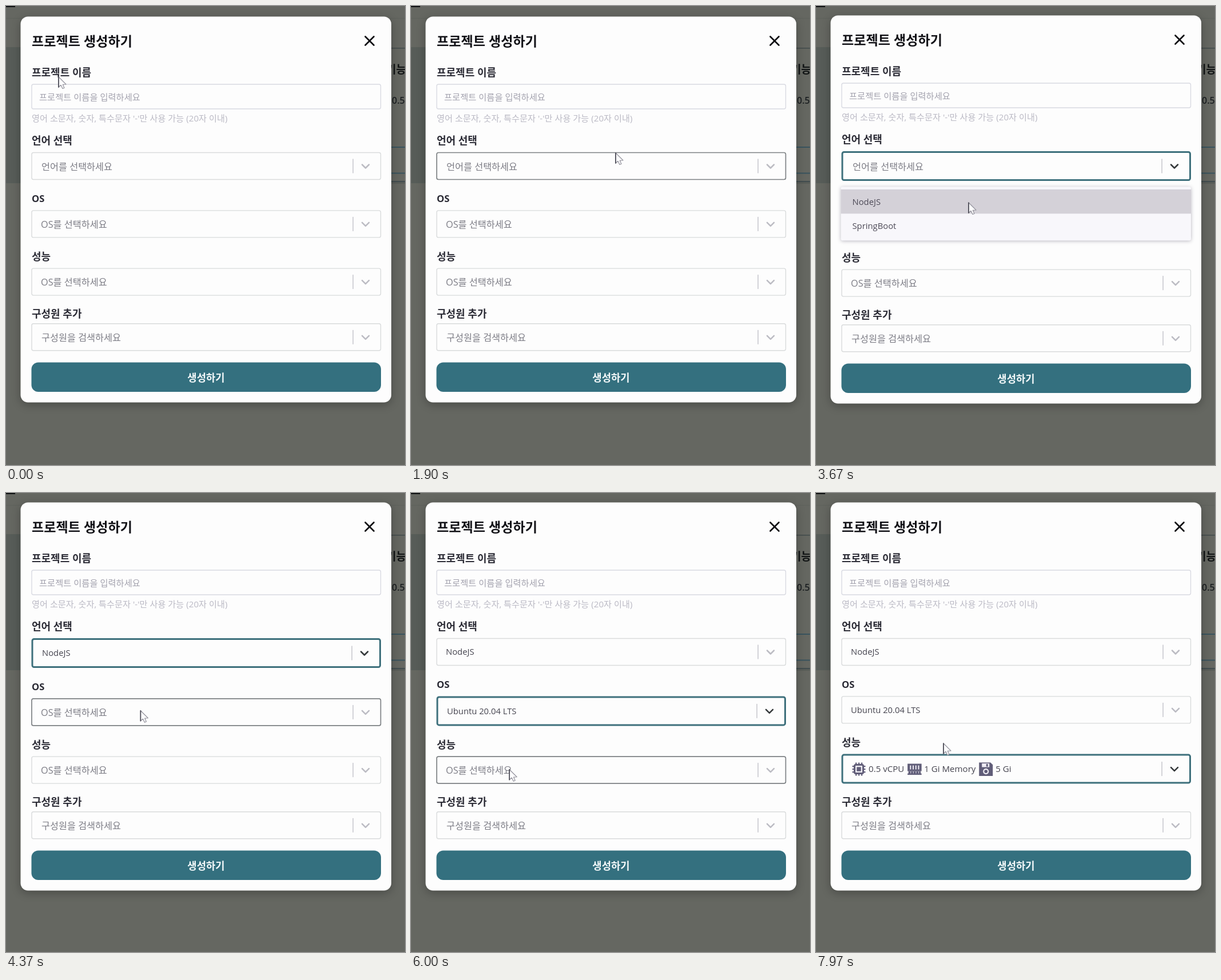
These frames come from a looping animation (698x803 px, 8000 ms). An HTML page with a canvas:

```html
<!DOCTYPE html>
<html lang="ko">
<head>
<meta charset="utf-8">
<style>
  html, body { margin: 0; width: 100%; height: 100%; overflow: hidden; background: #656761; }
  canvas { display: block; width: 698px; height: 803px; filter: blur(.5px); }
</style>
</head>
<body>
<canvas id="stage"></canvas>
<script>
const W = 698, H = 803, LOOP = 8000;
const FONT = '"Open Sans", "Noto Sans CJK KR", "Noto Sans CJK", sans-serif';
const BACK = '#656761', TEAL = '#34707f', ICON = '#605d78', PALE = '#efedf4';
const canvas = document.getElementById('stage');
const ctx = canvas.getContext('2d');
const dpr = window.devicePixelRatio || 1;
canvas.width = W * dpr;
canvas.height = H * dpr;

const SPECS = [['0.5', '1'], ['0.5', '2'], ['1', '1'], ['1', '2']];

// Resting positions; opened and picked are the times of the two clicks.
const SELECTS = [
  { label: '언어 선택', labelY: 235.5, top: 256, hint: '언어를 선택하세요', hintX: 62,
    options: ['NodeJS', 'SpringBoot'], row: 42.5, opened: 3070, picked: 4000 },
  { label: 'OS', labelY: 336.5, top: 357.4, hint: 'OS를 선택하세요', hintX: 61,
    options: ['Ubuntu 20.04 LTS'], row: 42.5, opened: 4470, picked: 5230 },
  { label: '성능', labelY: 438, top: 458.6, hint: 'OS를 선택하세요', hintX: 61,
    options: SPECS, row: 44.6, opened: 6030, picked: 7600 },
  { label: '구성원 추가', labelY: 538.5, top: 555.3, hint: '구성원을 검색하세요', hintX: 62,
    options: [], row: 42.5, opened: Infinity, picked: Infinity }
];

// time, x, y of the pointer tip
const PATH = [
  [0, 92, 124], [250, 93, 125], [1650, 358, 256], [1900, 358, 257], [2770, 350, 262],
  [3070, 345, 276], [3670, 267, 344], [4000, 262, 348], [4470, 232, 385],
  [5230, 202, 446], [5430, 200, 449], [6030, 172, 484], [6600, 150, 536],
  [6770, 150, 537], [7170, 151, 541], [7570, 151, 541], [7970, 223, 438], [8000, 224, 437]
];

function pointerAt(t) {
  const i = Math.max(1, PATH.findIndex(p => p[0] > t));
  const [t0, x0, y0] = PATH[i - 1], [t1, x1, y1] = PATH[i];
  const u = (t - t0) / (t1 - t0), k = u * u * (3 - 2 * u);
  return { x: x0 + (x1 - x0) * k, y: y0 + (y1 - y0) * k };
}

function rect(x, y, w, h, color) {
  ctx.fillStyle = color;
  ctx.fillRect(x, y, w, h);
}

function roundBox(x, y, w, h, r, fill, stroke, lw) {
  ctx.beginPath();
  ctx.roundRect(x, y, w, h, r);
  if (fill) { ctx.fillStyle = fill; ctx.fill(); }
  if (stroke) { ctx.strokeStyle = stroke; ctx.lineWidth = lw; ctx.stroke(); }
}

function polyline(points, color, lw) {
  ctx.beginPath();
  points.forEach(p => ctx.lineTo(p[0], p[1]));
  ctx.strokeStyle = color;
  ctx.lineWidth = lw;
  ctx.stroke();
}

function polygon(points, color) {
  ctx.beginPath();
  points.forEach(p => ctx.lineTo(p[0], p[1]));
  ctx.closePath();
  ctx.fillStyle = color;
  ctx.fill();
}

// y is the optical middle of the line; returns the text width
function text(str, x, y, size, color, weight = 400, align = 'left') {
  ctx.font = `${weight} ${size}px ${FONT}`;
  ctx.textAlign = align;
  ctx.fillStyle = color;
  ctx.fillText(str, x, y + size * 0.37);
  return ctx.measureText(str).width;
}

function withShadow(color, blur, offset, draw) {
  ctx.save();
  ctx.shadowColor = color;
  ctx.shadowBlur = blur * dpr;
  ctx.shadowOffsetY = offset * dpr;
  draw();
  ctx.restore();
}

function backdrop() {
  rect(0, 0, W, H, BACK);
  rect(0, 72, 30, 238, '#575c58');
  rect(0, 21, W, 1, '#5e615c');
  rect(0, 0, 16, 2, '#0d0f10');
  rect(672, 73, 26, 1.5, '#414a4a');
  rect(672, 246, 26, 2, '#38535e');
  rect(672, 291.5, 26, 2, '#38535e');
  rect(672, 306, 26, 2, '#414d4f');
  rect(672, 308, 26, 3, '#595d58');
  text('기능', 665, 111, 19, '#101314', 700);
  text('0.5', 675, 165, 16, '#1c2022', 600);
}

function chipIcon(x, y) {
  for (let i = -1; i <= 1; i++) {
    rect(x + 11 + i * 5, y - 11, 2.2, 23, ICON);
    rect(x + 0.5, y - 0.5 + i * 5, 23, 2.2, ICON);
  }
  roundBox(x + 4.5, y - 7, 15, 15, 2, PALE, ICON, 3);
  rect(x + 8.3, y - 3.2, 7.4, 7.4, ICON);
}

function memoryIcon(x, y) {
  rect(x, y - 9, 24.5, 13, ICON);
  for (let i = 0; i < 4; i++) rect(x + 4.2 + i * 4.7, y - 6, 2, 7, PALE);
  rect(x + 1.5, y + 4, 21.5, 4.5, ICON);
  for (let i = 0; i < 4; i++) rect(x + 5 + i * 4.6, y + 4.5, 1.2, 4, '#cfccd8');
  rect(x, y + 8, 24.5, 2.5, ICON);
}

function diskIcon(x, y) {
  polygon([[x, y - 11], [x + 20, y - 11], [x + 24, y - 7], [x + 24, y + 12.5], [x, y + 12.5]], ICON);
  rect(x + 5, y - 9.5, 13, 6.5, PALE);
  rect(x + 12.5, y - 8.5, 3, 4.5, ICON);
  ctx.beginPath();
  ctx.arc(x + 12, y + 4.5, 4, 0, Math.PI * 2);
  ctx.strokeStyle = PALE;
  ctx.lineWidth = 2.2;
  ctx.stroke();
}

function drawOption(option, x, y, color) {
  if (typeof option === 'string') {
    text(option, x, y, 14.8, color);
    return;
  }
  const parts = [
    [chipIcon, option[0] + ' vCPU'],
    [memoryIcon, option[1] + ' Gi Memory'],
    [diskIcon, '5 Gi']
  ];
  for (const [icon, str] of parts) {
    icon(x, y);
    x += 29;
    x += text(str, x, y, 15.1, color) + 5.8;
  }
}

function drawSelect(s, t, y, focused, hovered) {
  const h = focused ? 52 : 48, mid = y + h / 2 + 0.5;
  const shift = focused ? 2 : 0;
  if (focused) roundBox(46, y + 1.5, 608.5, h - 3, 3, '#fdfdfd', '#3e707c', 3);
  else roundBox(45, y + 0.5, 610.5, h - 1, 3, '#fdfdfd', hovered ? '#7c8083' : '#d9dbdc', hovered ? 1.7 : 1.4);

  if (t >= s.picked) drawOption(s.options[0], 61 + shift, mid - 0.5, '#45444f');
  else text(s.hint, s.hintX + shift, mid, 16.3, '#7c7c85');

  rect(606.3 - shift, mid - 13, 1.6, 25, '#c9c9cf');
  const cx = 629 - shift;
  polyline([[cx - 6, mid - 3], [cx, mid + 3], [cx + 6, mid - 3]],
    focused ? '#34383a' : '#bcbcc3', 2.5);
}

function drawMenu(s, fieldTop, modalBottom) {
  const top = fieldTop + 62.3;
  const scrolls = s.options === SPECS;
  const height = scrolls ? modalBottom - top : s.options.length * s.row + 9;
  const right = scrolls ? 638 : 656;
  withShadow('rgba(60,55,80,.35)', 6, 1, () => roundBox(43.5, top, 612.5, height, 3, '#f8f7fb'));
  rect(43.5, top + 4.5, right - 43.5, s.row, '#d4d1d8');
  s.options.forEach((option, i) =>
    drawOption(option, 63.5, top + 4.5 + (i + 0.5) * s.row, '#4d4a57'));
  if (!scrolls) return;
  rect(638, top, 17.5, height, '#f0eff3');
  rect(639, 537.5, 15, 132, '#b8b6bc');
  polygon([[642.5, 531], [650.5, 531], [646.5, 526.5]], '#8e8c94');
  polygon([[642.5, 685], [650.5, 685], [646.5, 689.5]], '#47454d');
}

function drawPointer({ x, y }) {
  ctx.save();
  ctx.translate(x, y);
  ctx.beginPath();
  [[0, 0], [0, 18], [4, 14.3], [7, 20.5], [10, 19.2], [7.4, 13.4], [13, 13]]
    .forEach(p => ctx.lineTo(p[0], p[1]));
  ctx.closePath();
  ctx.fillStyle = '#fdfdfe';
  ctx.fill();
  ctx.strokeStyle = '#93929c';
  ctx.lineWidth = 1.2;
  ctx.stroke();
  polyline([[0, 0], [0, 18]], '#4b4b55', 1.7);
  ctx.restore();
}

function render(t) {
  ctx.setTransform(dpr, 0, 0, dpr, 0, 0);
  ctx.lineJoin = 'round';
  ctx.lineCap = 'round';
  const pointer = pointerAt(t);
  let active = -1;
  SELECTS.forEach((s, i) => { if (t >= s.opened) active = i; });

  // A focused field is 4px taller and the dialog stays centred.
  const lift = active >= 0 ? -2 : 0;
  const drop = -lift;
  const top = 18.5 + lift, bottom = 693.5 + drop;

  backdrop();
  withShadow('rgba(0,0,0,.28)', 16, 4, () => roundBox(25.5, top, 648.5, bottom - top, 13, '#fdfdfd'));

  text('프로젝트 생성하기', 45, 61.5 + lift, 23.1, '#121217', 700);
  const cy = 61 + lift;
  polyline([[628.5, cy - 7.5], [643.5, cy + 7.5]], '#0c0c10', 2.7);
  polyline([[643.5, cy - 7.5], [628.5, cy + 7.5]], '#0c0c10', 2.7);

  text('프로젝트 이름', 45, 116 + lift, 18, '#2b2b35', 700);
  roundBox(45, 137 + lift, 610.5, 43, 3, '#fdfdfd', '#d9dae2', 1.4);
  text('프로젝트 이름을 입력하세요', 58, 159 + lift, 15.3, '#a3a2ae');
  text("영어 소문자, 숫자, 특수문자 '-'만 사용 가능 (20자 이내)", 45, 196 + lift, 15.2, '#bbbac5');

  const placeY = (s, i) => s.top + (active >= 0 && i > active ? drop : lift);
  SELECTS.forEach((s, i) => {
    const y = placeY(s, i);
    const hovered = pointer.y >= y && pointer.y <= y + 48;
    text(s.label, 45, s.labelY + y - s.top, s.label === 'OS' ? 16.6 : 18, '#2b2b35', 700);
    drawSelect(s, t, y, i === active, hovered);
  });

  roundBox(44.5, 623.5 + drop, 611.5, 51.5, 12, TEAL);
  text('생성하기', 350, 650 + drop, 17.8, '#f5fafb', 700, 'center');

  const current = SELECTS[active];
  if (current && t < current.picked) {
    ctx.save();
    ctx.beginPath();
    ctx.roundRect(25.5, top, 648.5, bottom - top, 13);
    ctx.clip();
    drawMenu(current, placeY(current, active), bottom);
    ctx.restore();
  }
  drawPointer(pointer);
}

const start = performance.now();
function tick() {
  render((performance.now() - start) % LOOP);
  requestAnimationFrame(tick);
}
tick();
</script>
</body>
</html>
```
